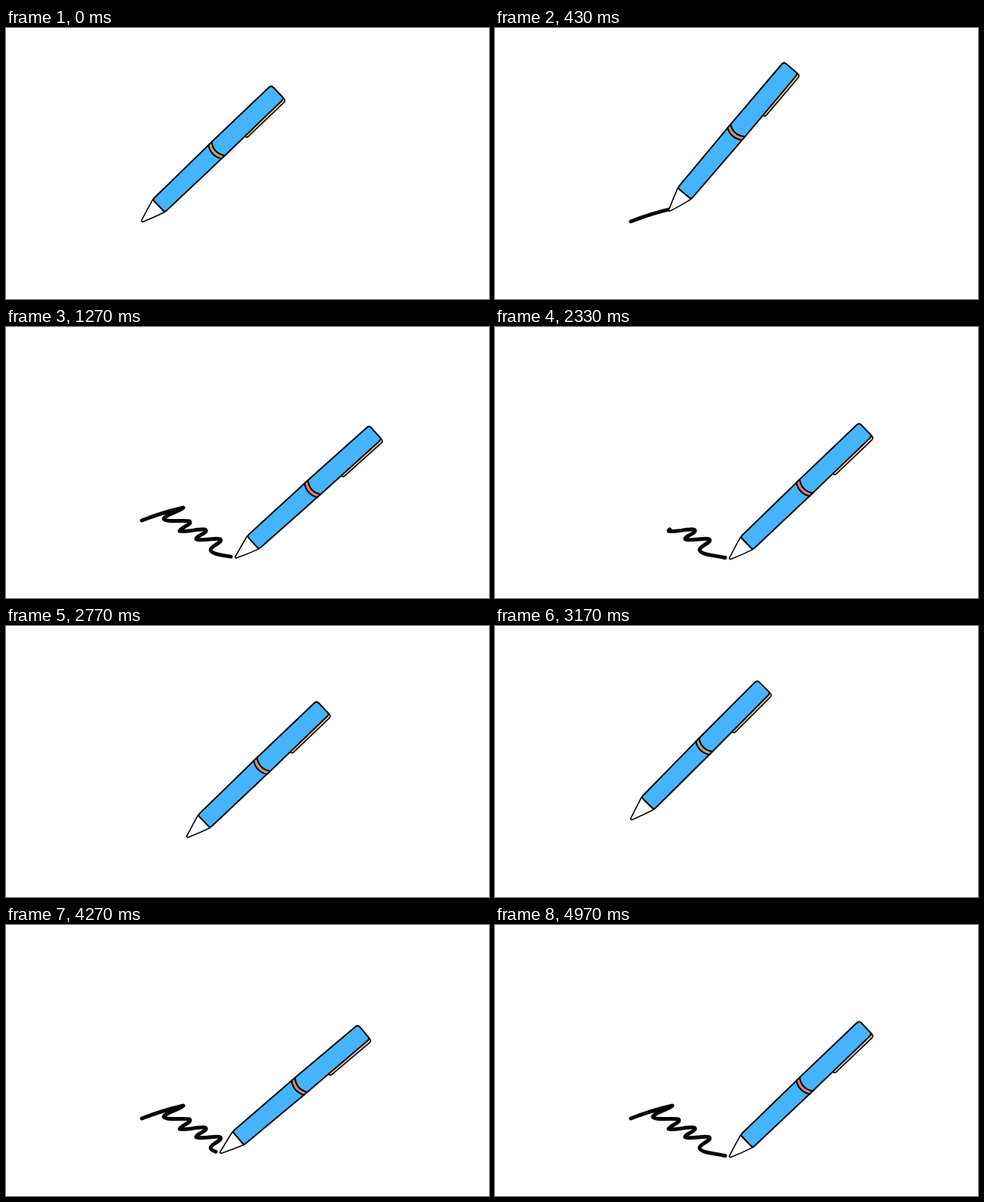
Animation, 640 px wide and 360 px high, one loop 5030 ms. Source, as an HTML page:

```html
<!DOCTYPE html>
<html lang="en">
<head>
<meta charset="utf-8">
<title>Writing pen</title>
<style>
  html, body { margin: 0; width: 100%; height: 100%; overflow: hidden; background: #fff; }
  svg { display: block; width: 100%; height: 100%; }
  path { stroke: #050505; stroke-linejoin: round; stroke-linecap: round; }
  #line { fill: none; stroke-width: 5; }
  #pen path { stroke-width: 2; }
  #pen .thin { stroke-width: 1.6; }
  .blue { fill: #46b4fd; }
</style>
</head>
<body>
<svg viewBox="0 0 640 360">
  <path id="line" d="M180 257C198 250 217 244 235 240C228 246 211 249 209 255C213 260 236 256 243 258C248 262 230 267 230 271C240 273 258 267 264 269C270 273 250 278 252 282C260 285 279 279 284 282C288 286 271 291 271 296C272 303 293 303 311 308"/>
  <!-- The pen lies along +x with its tip at the origin -->
  <g id="pen">
    <path class="thin" fill="#fff" d="M0 -1Q16 -6.5 30.5 -11V12Q16 7.5 0 1Z"/>
    <path class="thin" id="clip" d="M177 11V13Q177 16 180 16H245Q249 16 249 12V8Z"/>
    <path class="blue" d="M33.5 -11.2L135 -12.2V12.8L33.5 12.2Q30.5 12.2 30.5 9.2V-8.2Q30.5 -11.2 33.5 -11.2Z"/>
    <path id="ring" d="M134 -12.3Q126 0 134 12.8H141V-12.3Z"/>
    <path class="blue" d="M140 -12.3H245Q249 -12.3 249 -8.3V8.3Q249 12.3 245 12.3L140 12.8Q131 0 140 -12.3Z"/>
  </g>
</svg>
<script>
const LOOP = 5030, CYCLE = 3140;
const LAG = 7;                 // ink trails the tip by this length
const REST = 43.7, SWAY = 8.5; // pen tilt in degrees

const [line, pen, ring, clip] = ['line', 'pen', 'ring', 'clip'].map(id => document.getElementById(id));
const total = line.getTotalLength();
const start = line.getPointAtLength(0), end = line.getPointAtLength(total);

const mix = (a, b, k) => a + (b - a) * k;
const ramp = (t, from, to) => Math.min(1, Math.max(0, (t - from) / (to - from)));
const smooth = k => (1 - Math.cos(Math.PI * k)) / 2;
const blend = (a, b, k) => `rgb(${a.map((v, i) => Math.round(mix(v, b[i], k)))})`;

// One damped swing: upright on the first strokes, then leaning slightly
const swing = k => SWAY * (1 - 0.7 * k) * Math.sin(2 * Math.PI * k ** 0.95);

function render(time) {
  const t = time % CYCLE;
  const write = ramp(t, 0, 1410);
  const erase = ramp(t, 1940, 2740);
  const back = smooth(ramp(t, 2360, CYCLE));

  const drawn = smooth(write) * total;
  const tip = line.getPointAtLength(drawn);
  const x = mix(tip.x, start.x, back), y = mix(tip.y, start.y, back);
  pen.setAttribute('transform', `translate(${x} ${y}) rotate(${-REST - swing(write)})`);

  const from = erase * (total - LAG);
  const length = Math.max(0, drawn - LAG - from);
  line.style.visibility = length > 0.1 ? 'visible' : 'hidden';
  line.style.strokeDasharray = `${length} ${total * 2}`;
  line.style.strokeDashoffset = -from;

  // The trim turns from gold to rose as the pen moves right
  const across = ramp(x, start.x, end.x);
  ring.setAttribute('fill', blend([186, 162, 118], [218, 124, 120], across));
  clip.setAttribute('fill', blend([240, 208, 140], [242, 194, 172], across));
}

const begin = performance.now();
function tick() {
  render((performance.now() - begin) % LOOP);
  requestAnimationFrame(tick);
}
tick();
</script>
</body>
</html>
```
